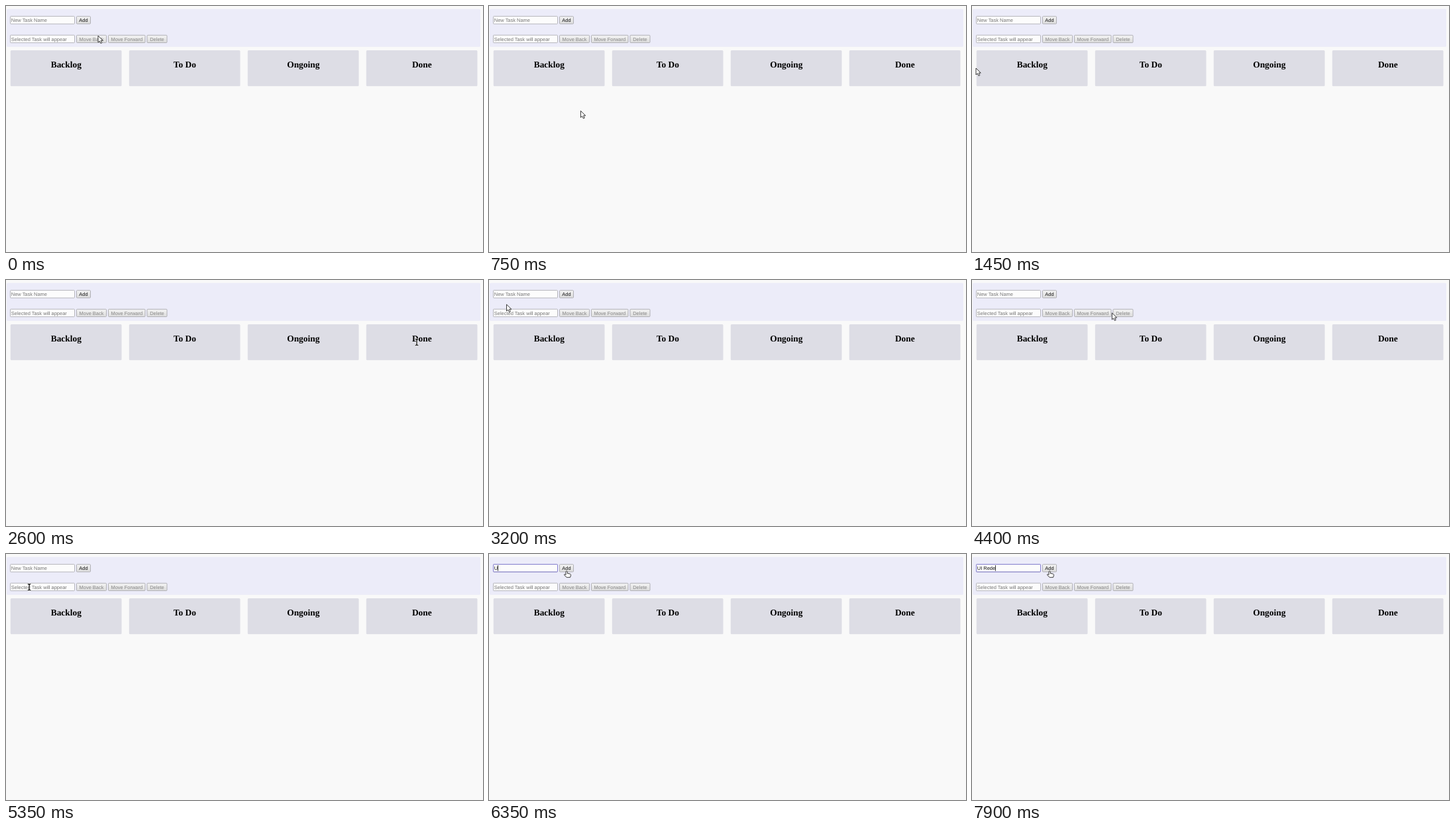
Recreate the animation shown at these times as an HTML page. Size 720 by 372 pixels, loop 8 s.

```html
<!DOCTYPE html>
<html>
<head>
<meta charset="utf-8">
<style>
html, body { margin: 0; width: 100%; height: 100%; overflow: hidden; background: #f9f9f9; }
svg { display: block; }
text { font: 7.46px "Liberation Sans", Arial, sans-serif; text-rendering: geometricPrecision; white-space: pre; fill: #111; }
.title { font: bold 13.4px "Liberation Serif", "Times New Roman", serif; text-anchor: middle; fill: #000; }
.button { text-anchor: middle; }
.hint { fill: #777; }
.off { fill: #858585; }
</style>
</head>
<body>
<svg width="720" height="372" viewBox="0 0 720 372">
  <defs>
    <linearGradient id="face" x2="0" y2="1">
      <stop stop-color="#f4f4f4"/><stop offset="1" stop-color="#dcdcdc"/>
    </linearGradient>
    <path id="bar" d="M-2.3-4.7Q0-4.7 0-3.5V3.5Q0 4.7-2.3 4.7M2.3-4.7Q0-4.7 0-3.5M0 3.5Q0 4.7 2.3 4.7"/>
  </defs>
  <rect x="1" y="4.5" width="715" height="57.3" rx="1.5" fill="#ececf9"/>
  <g id="page"></g>
  <rect id="focus" x="6.5" y="15.6" width="97" height="11.5" rx="1" fill="none" stroke="#8680d4"/>
  <text id="typed" x="7.8" y="24"></text>
  <rect id="caret" y="17" width=".8" height="8.6"/>
  <g id="cursor" stroke-linejoin="round">
    <path id="arrow" d="M0 0V10L2.3 8 4 11.5 5.8 10.7 4.2 7.2H7.3Z" fill="#fff" stroke="#222" stroke-width=".9"/>
    <path id="hand" d="M-1.5 6V1Q-.3-.6 .8 1V3.8L5 4.6Q6.2 5 6 7L5 9.8H-.3L-4 6.3Q-4 4.6-2.6 5.3Z" fill="#fff" stroke="#222" stroke-width=".9"/>
    <g id="beam" fill="none">
      <use href="#bar" stroke="#fff" stroke-width="2.4"/>
      <use href="#bar" stroke="#111" stroke-width="1.3"/>
    </g>
  </g>
</svg>
<script>
const $ = id => document.getElementById(id);
const page = $('page');
const zones = [];   // areas that change the pointer
let markup = '';

function zone(kind, x, y, w, h) {
  zones.push({ kind, holds: (px, py) => px >= x && px <= x + w && py >= y && py <= y + h });
}

function field(y, hint, id) {
  markup += `<rect x="6.5" y="${y}" width="97" height="11.5" rx=".8" fill="#fcfcfc" stroke="#b6b6bc"/>
    <text class="hint" id="${id}" x="7.8" y="${y + 8.4}">${hint}</text>`;
  zone('beam', 6, y, 98, 12);
}

function button(x, y, w, label, state) {
  markup += `<rect x="${x + .5}" y="${y}" width="${w - 1}" height="11.3" rx="1" fill="url(#face)" stroke="#b0b0b5"/>
    <text class="button ${state}" x="${x + w / 2}" y="${y + 8.4}">${label}</text>`;
  zone('hand', x, y + 2, w, 10);
}

field(15.6, 'New Task Name', 'hint');
field(44.1, 'Selected Task will appear', 'selected');
button(106, 15.7, 22, 'Add', '');
button(106, 44.2, 46, 'Move Back', 'off');
button(154, 44.2, 56.5, 'Move Forward', 'off');
button(212.5, 44.2, 31, 'Delete', 'off');

['Backlog', 'To Do', 'Ongoing', 'Done'].forEach((name, i) => {
  const x = 6.8 + 179 * i;
  markup += `<rect x="${x}" y="67" width="167.7" height="54.3" rx="1.5" fill="#dddde5"/>
    <text class="title" x="${x + 84}" y="92.5">${name}</text>`;
  zone('beam', x + 66, 80, 36, 17);
});
page.innerHTML = markup;

// the pointer flicks from stop to stop at an even beat
const stops = [
  [139, 45], [33, 20], [472, 283], [110, 148], [70, 60], [6, 94], [204, 92], [330, 104],
  [645, 100], [620, 94], [700, 97], [23, 48], [32, 20], [70, 109], [450, 92], [627, 82],
  [123, 43], [179, 50], [179, 50], [34, 50], [20, 18], [117.5, 25.5]
];
const beat = 850 / 3, firstMove = 50;
const phrase = 'UI Rede';
const focusTime = 5600, firstKey = 6350, keyGap = 250;

function pointerAt(t) {
  const step = Math.min(Math.max((t - firstMove) / beat, 0), stops.length - 1);
  const i = Math.floor(step);
  const from = stops[i], to = stops[i + 1] || from;
  const ease = 1 - (1 - step + i) ** 4;
  return from.map((v, axis) => v + (to[axis] - v) * ease);
}

const show = (id, on) => $(id).style.display = on ? '' : 'none';

function draw(t) {
  const [x, y] = pointerAt(t);
  const hit = zones.find(z => z.holds(x, y));
  const kind = hit ? hit.kind : 'arrow';
  for (const id of ['arrow', 'hand', 'beam']) show(id, id === kind);
  $('cursor').setAttribute('transform', `translate(${x} ${y})`);

  const count = Math.max(0, Math.floor((t - firstKey) / keyGap) + 1);
  const lastAction = count ? firstKey + (count - 1) * keyGap : focusTime;
  $('typed').textContent = phrase.slice(0, count);
  $('caret').setAttribute('x', 7.6 + (count && $('typed').getComputedTextLength()));
  show('hint', !count);
  show('focus', t >= focusTime);
  show('caret', t >= focusTime && (t - lastAction) % 1000 < 500);
}

const start = performance.now();
function tick() {
  const t = (performance.now() - start) % 8000;
  draw(Math.floor(t / 50) * 50);
  requestAnimationFrame(tick);
}
tick();
</script>
</body>
</html>
```
